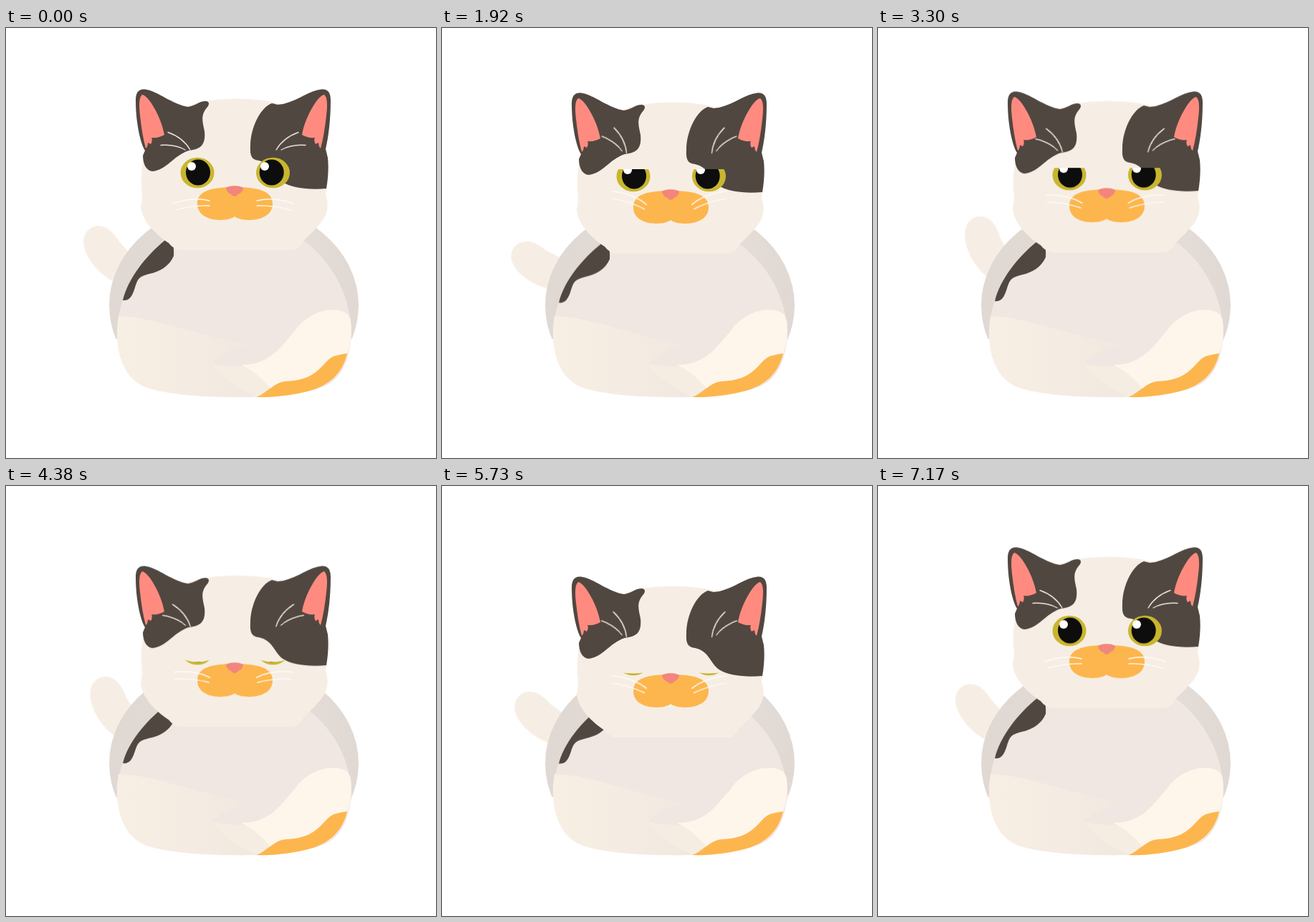
An HTML page for the animation above (7.2 s loop, 600 by 600 pixels).

```html
<!DOCTYPE html>
<html lang="en">
<head>
<meta charset="utf-8">
<title>Sleepy cat</title>
<style>
  html, body { margin: 0; width: 100%; height: 100%; overflow: hidden; background: #fff; }
  svg { display: block; width: 100vw; height: 100vh; }

  .dark { fill: #504740; }
  .cream { fill: #f6eee4; }
  .torso { fill: #f0e7e2; }
  .orange { fill: #fdb64d; }
  .pink { fill: #ff8b80; }
  .brow, .cheek { fill: none; stroke-width: 1.4; stroke-linecap: round; }
  .brow { stroke: #eee4dc; }
  .cheek { stroke: #fffaf4; }

  .head, .squash, .tail, .brow, .cheek, .lid {
    animation: 7.2s cubic-bezier(.37, 0, .63, 1) infinite;
  }
  .head { animation-name: nod; }
  .squash { animation-name: breathe; transform-origin: 318px 515px; }
  .tail { animation-name: wag; animation-delay: -6.9s; transform-origin: 186px 342px; }
  .brow { animation-name: lift; transform-origin: 258px 171px; }
  .cheek { animation-name: lift; transform-origin: 284px 244px; }
  .lid { animation-name: doze; }

  @keyframes nod {
    0%, 100% { transform: translateY(0); }
    16.67% { transform: translateY(11.3px); }
    36.11%, 38.19% { transform: translateY(-.8px); }
    76.39%, 85.97% { transform: translateY(41px); }
  }
  @keyframes breathe {
    0%, 100% { transform: scaleY(1); }
    16.67% { transform: scaleY(.948); }
    36.11%, 38.19% { transform: scaleY(1.002); }
    65.28%, 85.97% { transform: scaleY(.946); }
  }
  @keyframes wag {
    0%, 100% { transform: rotate(1.2deg); }
    26.39% { transform: rotate(-20deg); }
    45.83%, 48.61% { transform: rotate(20deg); }
    71.53% { transform: rotate(-10deg); }
  }
  @keyframes lift {
    0%, 4.17%, 100% { transform: rotate(0deg); }
    29.17% { transform: rotate(26deg); }
    56.94% { transform: rotate(12deg); }
    79.17% { transform: rotate(24deg); }
  }
  /* The clip keeps what lies below the eyelid. */
  @keyframes doze {
    0%, 16.67%, 95.83%, 100% { d: path("M-30 -25Q0 -25 30 -25V30H-30Z"); }
    23.61%, 47.22% { d: path("M-30 -10Q0 -10 30 -10V30H-30Z"); }
    59.72% { d: path("M-30 9Q0 26 30 9V30H-30Z"); }
    76.39%, 86.11% { d: path("M-30 13Q0 24 30 13V30H-30Z"); }
  }
</style>
</head>
<body>
<svg viewBox="0 0 600 600">
  <defs>
    <clipPath id="open"><path class="lid" d="M-30 -25Q0 -25 30 -25V30H-30Z"/></clipPath>
    <clipPath id="upper"><path d="M140 240H500V434H140Z"/></clipPath>
    <linearGradient id="side" x2="1">
      <stop offset="0" stop-color="#e0d8d3"/>
      <stop offset=".8" stop-color="#e4dcd7"/>
      <stop offset="1" stop-color="#e0d8d3"/>
    </linearGradient>
    <linearGradient id="leg" x2="1">
      <stop offset="0" stop-color="#f8efe4"/>
      <stop offset="1" stop-color="#f0e7e0"/>
    </linearGradient>
    <path id="brow" d="M226 145.500Q247 153 257 170M216 163.500Q236 162 250 170"/>
    <path id="cheek" d="M284 241Q260 235 233 245M284 248Q261 247 237 254"/>
    <path id="inner-ear" class="pink" d="M190 93C199 94 217 125 221 149Q213 154 203 153Q205 157 202 162L198 160Q198 165 195 168Q190 150 187 122C185 105 186 96 190 93Z"/>
  </defs>

  <path class="cream tail" d="M113 318C103 300 107 281 125 277C141 275 151 288 158 299L188 330L180 364Q164 360 150 354C136 347 122 335 113 318Z"/>

  <ellipse cx="318" cy="387" rx="174" ry="144" fill="url(#side)" clip-path="url(#upper)"/>

  <g class="squash">
    <path class="torso" d="M155 434C156 410 157 395 163 380C170 350 195 318 222 296Q318 258 415 296C447 320 468 354 476 385Q483 410 482 434L460 470H180Z"/>
    <path class="dark" d="M222 296C232 295 235 302 234 318C228 332 215 340 200 343C185 347 184 350 180 362C176 375 172 381 163 380C170 350 195 318 222 296Z"/>
  </g>

  <path class="torso" d="M155 420C156 458 164 486 192 500C220 511 275 515 320 515C375 515 430 510 453 495C476 479 482 445 482 420Z"/>
  <path fill="url(#leg)" d="M157 402C215 404 270 431 340 442Q300 452 289 468Q310 496 362 514Q335 516 300 514.500C255 513 217 510 192 500C160 485 150 443 157 402Z"/>
  <path fill="#f6ede2" d="M288 469Q318 475 345 471L375 498L350 515Q307 496 288 469Z"/>
  <path fill="#fef6eb" d="M328 470C368 470 382 446 401 425C416 403 440 390 465 394Q478 396 481 408Q484 432 476 455L420 495L370 505Q352 481 328 470Z"/>
  <path class="orange" d="M349 515C364 510 373 495 390 493C410 492 424 488 436 477C445 469 450 460 459 457.500Q467 455 476 454C470 481 452 497 428 505C405 512 373 516 349 515Z"/>

  <g class="head">
    <path class="cream" d="M252 110C277 96 355 95 385 107L447 170C451 192 450 212 446 232C451 246 449 260 440 271Q429 284 415 297Q409 310 397 310H247Q234 310 227 300C209 288 190 270 188 249Q191 236 189 222C188 204 190 192 193 173Z"/>
    <path class="dark" d="M181 101C181 89 186 84 196 86C211 88 233 107 254 110C264 109 269 102 279 102Q285 103 282 109C271 121 274 130 277 144C279 165 270 169 255 171C232 179 225 198 204 200C196 199 191 190 191 178L194 171C188 162 181 133 181 101Z"/>
    <path class="dark" d="M453 101C453 89 448 84 438 86C421 88 401 106 379 107L371 105C356 110 341 138 341 165C340 180 344 184 353 185C372 189 374 205 385 214C398 224 425 226 447 224Q451 200 449 181L446 169C450 152 453 128 453 101Z"/>
    <use href="#inner-ear"/>
    <use href="#inner-ear" transform="matrix(-1 0 0 1 634 0)"/>

    <g transform="translate(267 202)"><g clip-path="url(#open)">
      <ellipse rx="23.500" ry="21.300" fill="#c8b62f"/>
      <ellipse cx="1" cy="-.5" rx="17" ry="18" fill="#0d0d0d"/>
      <circle cx="-8" cy="-9" r="6" fill="#fff"/>
    </g></g>
    <g transform="translate(372.500 202)"><g clip-path="url(#open)">
      <ellipse rx="23.500" ry="21.300" fill="#c8b62f"/>
      <ellipse cx="-1.800" cy="-.5" rx="17" ry="18" fill="#0d0d0d"/>
      <circle cx="-11.500" cy="-9" r="6" fill="#fff"/>
    </g></g>

    <path class="orange" d="M319 263C310 271 267 272 267 245C267 228 285 222 319 222C353 222 372 228 372 245C372 272 328 271 319 263Z"/>
    <path fill="#f2857c" d="M307 224C308 219 330 219 331 224Q330 229 324 232Q319 238 314 232Q308 229 307 224Z"/>

    <g class="brow"><use href="#brow"/></g>
    <g class="cheek"><use href="#cheek"/></g>
    <g transform="matrix(-1 0 0 1 634 0)">
      <g class="brow"><use href="#brow"/></g>
      <g class="cheek"><use href="#cheek"/></g>
    </g>
  </g>
</svg>
</body>
</html>
```
